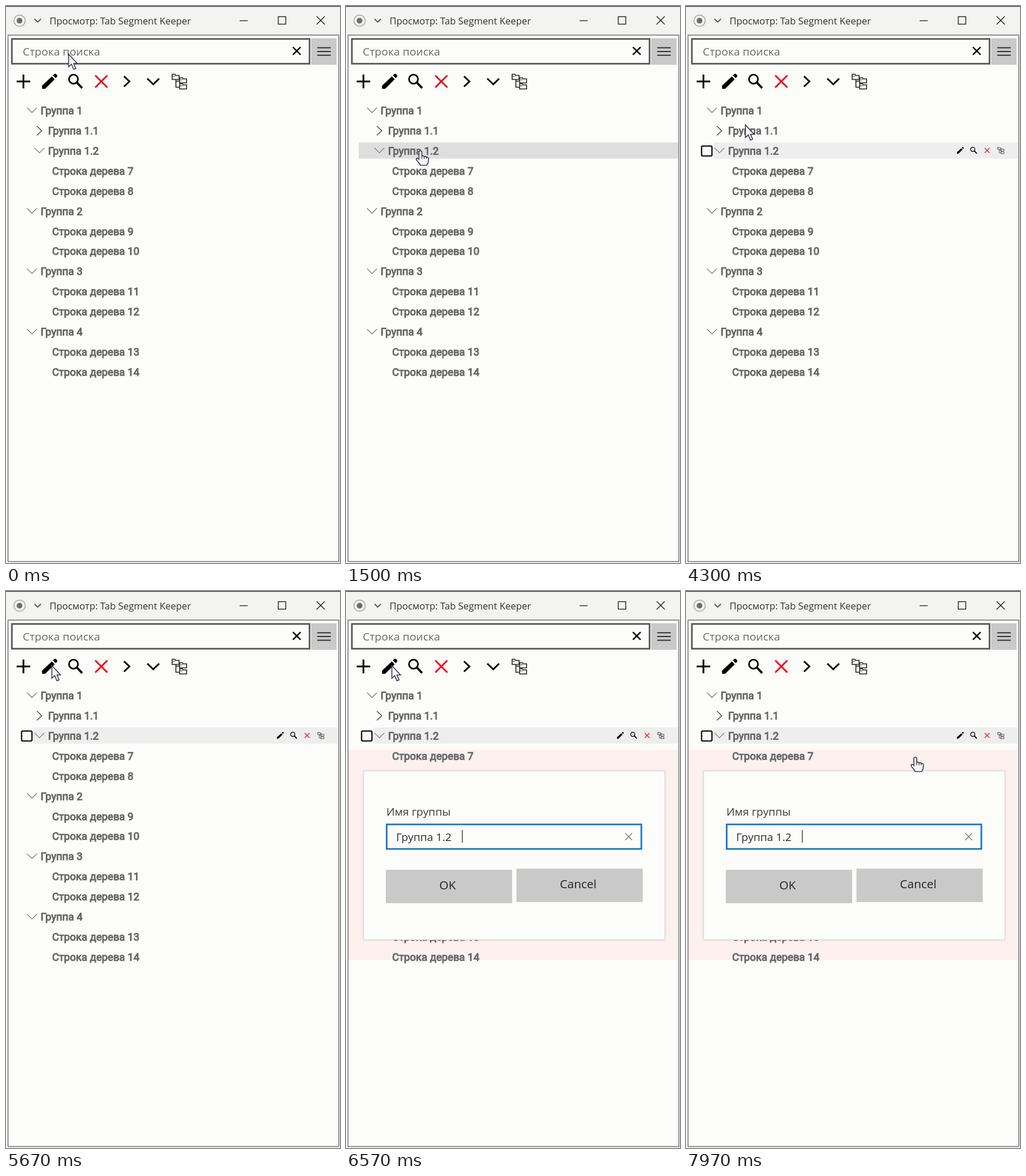
Recreate the animation shown at these times as an HTML page with a canvas. Size 579 px wide and 967 px high, loop 8 s.

```html
<!DOCTYPE html>
<html lang="ru">
<head>
<meta charset="utf-8">
<title>Просмотр</title>
<style>
html, body { margin: 0; width: 100%; height: 100%; overflow: hidden; background: #fcfcfb; }
canvas { display: block; }
</style>
</head>
<body>
<canvas id="stage" width="579" height="967"></canvas>
<script>
const ctx = document.getElementById('stage').getContext('2d');
const LOOP = 8000;
const PAPER = '#fcfcfb';
const UI = '"Open Sans", "Noto Sans", sans-serif';
const TREE = 'Roboto, Arial, sans-serif';

// label, indent level (2 = leaf), open state
const rows = [
  ['Группа 1', 0, true], ['Группа 1.1', 1, false], ['Группа 1.2', 1, true],
  ['Строка дерева 7', 2], ['Строка дерева 8', 2],
  ['Группа 2', 0, true], ['Строка дерева 9', 2], ['Строка дерева 10', 2],
  ['Группа 3', 0, true], ['Строка дерева 11', 2], ['Строка дерева 12', 2],
  ['Группа 4', 0, true], ['Строка дерева 13', 2], ['Строка дерева 14', 2]
];
const rowY = i => 181.5 + 34.95 * i;
const textX = [60, 73, 80];

// pointer path: time, x, y
const path = [
  [30, 108, 83], [870, 122, 168], [1500, 129, 252],
  [2570, 129, 252], [2800, 129, 258],
  [4130, 129, 258], [4300, 102.5, 206], [4970, 92, 131], [5130, 79, 129],
  [7330, 79, 129], [7970, 397.5, 289]
];

const clamp = v => Math.max(0, Math.min(1, v));

function rect(x, y, w, h, color) {
  ctx.fillStyle = color;
  ctx.fillRect(x, y, w, h);
}

function frame(x, y, w, h, color, width) {
  ctx.strokeStyle = color;
  ctx.lineWidth = width;
  ctx.strokeRect(x, y, w, h);
}

function line(points, color, width, close) {
  ctx.beginPath();
  points.forEach(([x, y], i) => i ? ctx.lineTo(x, y) : ctx.moveTo(x, y));
  if (close) ctx.closePath();
  ctx.strokeStyle = color;
  ctx.lineWidth = width;
  ctx.stroke();
}

function cross(x, y, r, color, width) {
  line([[x - r, y - r], [x + r, y + r]], color, width);
  line([[x + r, y - r], [x - r, y + r]], color, width);
}

function text(str, x, y, size, color, weight = 400, align = 'left') {
  ctx.font = `${weight} ${size}px ${UI}`;
  ctx.textAlign = align;
  ctx.fillStyle = color;
  ctx.fillText(str, x, y);
}

function placed(x, y, scale, draw) {
  ctx.save();
  ctx.translate(x, y);
  ctx.scale(scale, scale);
  draw();
  ctx.restore();
}

function pencil() {
  ctx.fillStyle = '#000';
  ctx.fill(new Path2D('M-13 13V7.5L4-8.5 9-3.5-7.5 13ZM5.8-10.2 8.2-12.6Q9.5-14 11-12.6L13-10.6Q14-9.3 13-8L10.6-5.4Z'));
}

function lens() {
  ctx.beginPath();
  ctx.arc(-3, -4, 7.8, 0, Math.PI * 2);
  ctx.strokeStyle = '#000';
  ctx.lineWidth = 2.8;
  ctx.stroke();
  line([[2.5, 1.5], [12, 11.5]], '#000', 3.8);
}

function folder(x, y) {
  line([[x, y], [x + 5, y], [x + 6, y + 2], [x + 12, y + 2], [x + 12, y + 9], [x, y + 9]], '#222', 1.6, true);
  line([[x, y + 3.5], [x + 5.5, y + 3.5]], '#444', 1);
}

function folders() {
  folder(-12, -12.5);
  folder(1, -6.5);
  folder(1, 4);
  line([[-5.5, -3.5], [-5.5, 10], [1, 10]], '#222', 1.6);
  line([[-5.5, -0.5], [1, -0.5]], '#222', 1.6);
}

function titleBar() {
  rect(0, 0, 579, 50, '#f3f3f1');
  rect(0, 0, 579, 1.3, '#34343c');
  ctx.beginPath();
  ctx.arc(23.5, 25.5, 9.8, 0, Math.PI * 2);
  ctx.strokeStyle = '#a4a4a4';
  ctx.lineWidth = 1.5;
  ctx.stroke();
  ctx.beginPath();
  ctx.arc(23.5, 25.5, 5, 0, Math.PI * 2);
  ctx.fillStyle = '#687068';
  ctx.fill();
  line([[49.5, 22.5], [55, 28], [60.5, 22.5]], '#555', 1.8);
  text('Просмотр: Tab Segment Keeper', 75.5, 32, 16.4, '#303030');
  line([[405, 25.5], [419, 25.5]], '#222', 1.3);
  frame(472, 18.5, 13, 13, '#222', 1.4);
  cross(545.5, 25, 7, '#222', 1.4);
  frame(3.5, 50.5, 573.5, 914, '#666', 1.4);
}

function searchBar() {
  frame(10.2, 57.2, 516, 43, '#555', 2.8);
  text('Строка поиска', 29, 85.5, 19, '#666');
  cross(504, 78, 6.7, '#000', 2.5);
  rect(529, 56, 44, 46, '#c9c9c9');
  for (const y of [72.5, 79, 85.5]) line([[539.5, y], [563, y]], '#222', 1.8);
}

function toolbar() {
  line([[18.5, 131], [42, 131]], '#000', 3);
  line([[30.2, 119], [30.2, 143]], '#000', 3);
  placed(75.5, 130.7, 1, pencil);
  placed(120, 131, 1, lens);
  cross(165.2, 131, 10.5, '#e8101c', 3);
  line([[204.5, 122], [214, 131], [204.5, 140]], '#000', 3);
  line([[245, 126], [255.3, 136], [265.5, 126]], '#000', 3);
  placed(300, 131, 1, folders);
}

function label(str, x, y) {
  ctx.font = `400 18.2px ${TREE}`;
  ctx.textAlign = 'left';
  ctx.fillStyle = ctx.strokeStyle = '#666';
  ctx.lineWidth = 1;
  ctx.fillText(str, x, y);
  ctx.strokeText(str, x, y);
}

function hover(row) {
  if (row < 0) return;
  const left = rows[row][1] ? 22 : 14;
  rect(left, rowY(row) - 14.5, 576 - left, 28, '#dedede');
}

function labels() {
  rows.forEach(([name, level, open], i) => {
    const y = rowY(i);
    label(name, textX[level], y + 6.3);
    if (level === 2) return;
    const x = 45 + 13 * level;
    if (open) line([[x - 8.5, y - 5], [x, y + 3.5], [x + 8.5, y - 5]], '#777', 1.3);
    else line([[x - 4.5, y - 8], [x + 4, y], [x - 4.5, y + 8]], '#444', 1.4);
  });
}

function selection(alpha) {
  if (!alpha) return;
  const y = rowY(2);
  ctx.save();
  ctx.globalAlpha = alpha;
  rect(14, y - 14.5, 34, 28, PAPER);
  rect(48, y - 14.5, 528, 28, '#eeeeef');
  ctx.beginPath();
  ctx.roundRect(27, y - 8.3, 18, 17.2, 2);
  ctx.strokeStyle = '#111';
  ctx.lineWidth = 2.3;
  ctx.stroke();
  placed(475.5, y - 0.7, 0.45, pencil);
  placed(498.5, y - 0.7, 0.47, lens);
  cross(522, y - 0.7, 4.2, '#e02038', 1.4);
  placed(545.5, y - 0.7, 0.44, folders);
  ctx.restore();
}

function button(str, x, y) {
  rect(x, y, 219, 58, '#c9c9c9');
  text(str, x + 107, y + 33.5, 20.5, '#222', 400, 'center');
}

function dialog() {
  ctx.save();
  ctx.shadowColor = 'rgba(0,0,0,.14)';
  ctx.shadowBlur = 4;
  rect(30, 312, 523, 294, '#dcdcdc');
  ctx.restore();
  rect(31.2, 313.2, 520.8, 291.6, PAPER);
  text('Имя группы', 70, 390, 19, '#3a3a3a');
  frame(70.5, 405.2, 441.5, 42.6, '#1478c4', 2.8);
  text('Группа 1.2', 87, 433.5, 19, '#2a2a2a');
  rect(200.8, 415, 1.7, 22, '#555');
  cross(490, 426.5, 6, '#777', 1.3);
  button('OK', 69, 484);
  button('Cancel', 295.5, 482);
}

function paint(shape, x, y) {
  placed(x, y, 1, () => {
    ctx.fillStyle = '#f8f8fa';
    ctx.fill(shape);
    ctx.strokeStyle = '#3a3a48';
    ctx.lineWidth = 1.6;
    ctx.stroke(shape);
  });
}

function arrow(x, y) {
  paint(new Path2D('M.5.5V22.5L5.5 18 9.3 27 13 25.3 9.4 16.8H15.5Z'), x, y);
}

function hand(x, y) {
  const shape = new Path2D('M-2.5 1.5Q-2.3-.5 0-.5T2.5 1.5V8.5Q4.5 7 6.5 9.5 8.5 8 10.3 10.5 13.5 9.5 14 13V16Q14 20.5 11 24.5H0Q-2.5 20-6.8 15.5-8 13-6 12-4.3 11.7-2.5 14Z');
  paint(shape, x, y);
  placed(x, y, 1, () => {
    for (const k of [2.5, 6.5, 10.3]) line([[k, 9], [k, 13.5]], '#3a3a42', 1.3);
  });
}

function pointer(t) {
  const i = path.findIndex(p => p[0] > t);
  if (i === 0) return path[0].slice(1);
  if (i < 0) return path[path.length - 1].slice(1);
  const [t0, x0, y0] = path[i - 1], [t1, x1, y1] = path[i];
  const k = (t - t0) / (t1 - t0);
  return [x0 + (x1 - x0) * k, y0 + (y1 - y0) * k];
}

function draw(t) {
  const [x, y] = pointer(t);
  const pointing = (t < 4160 && y >= 168) || (t > 7330 && y >= 237);
  const over = t < 3630 && y >= 168 ? Math.round((y - rowY(0)) / 34.95) : -1;

  rect(0, 0, 579, 967, PAPER);
  hover(over);
  selection(clamp((t - 3300) / 330));

  const shift = Math.round(579 * (1 - clamp((t - 5670) / 320)) ** 3);
  const showDialog = t > 5690;
  if (showDialog) {
    const left = Math.max(4, shift - 3);
    if (left < 576) rect(left, 276, 576 - left, 365, '#fdf1f0');
  }
  labels();
  titleBar();
  searchBar();
  toolbar();
  if (showDialog) placed(shift, 0, 1, dialog);
  (pointing ? hand : arrow)(x, y);
}

function tick() {
  draw(performance.now() % LOOP);
  requestAnimationFrame(tick);
}
tick();
</script>
</body>
</html>
```
